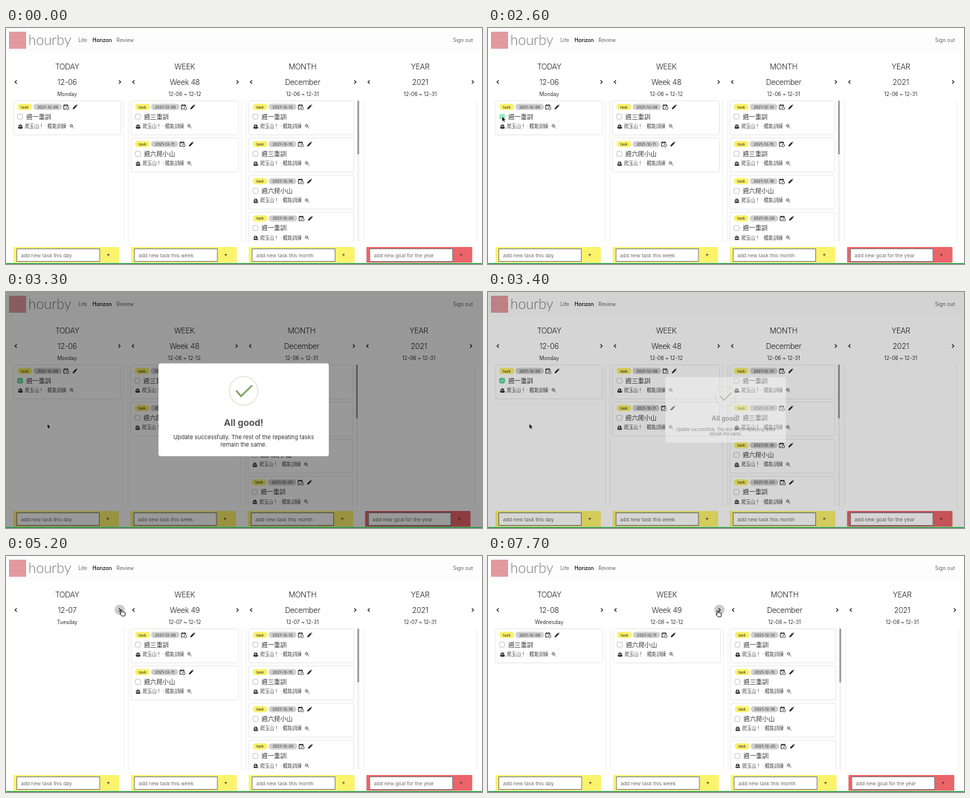
An HTML page that plays this animation: 640x319 px, repeating every 8 s.

```html
<!DOCTYPE html>
<html lang="en">
<head>
<meta charset="utf-8">
<title>Planner</title>
<style>
html, body { margin: 0; width: 100%; height: 100%; overflow: hidden; background: #fff; }
svg { display: block; width: 640px; height: 319px; }
text { font: 7px Inter, "Noto Sans CJK TC", "Noto Sans CJK", sans-serif; letter-spacing: -.06px; fill: #333; }
.mid { text-anchor: middle; }
.head { font-size: 10.2px; font-weight: 350; letter-spacing: -.25px; fill: #222; }
.nav { fill: #666; }
.brand { font: 300 19px Lato, sans-serif; fill: #777; }
.pill { font-size: 5.3px; text-anchor: middle; }
.title { font: 300 8.4px "Noto Sans CJK TC", "Noto Sans CJK", sans-serif; letter-spacing: 0; }
.goal { font-size: 6.3px; letter-spacing: 0; fill: #444; }
.hint { font-size: 6.8px; fill: #6c6c6c; }
.plus { font-weight: 600; text-anchor: middle; }
.line { fill: none; stroke: #333; }
#dialog .title { font: 600 12.3px Inter, sans-serif; fill: #444; }
#dialog .body { font-size: 7.8px; }
</style>
</head>
<body>
<svg viewBox="0 0 640 319">
  <defs>
    <clipPath id="list"><rect y="97.5" width="640" height="192"/></clipPath>
    <filter id="shadow" x="-10%" y="-20%" width="120%" height="150%">
      <feDropShadow dx="0" dy="1" stdDeviation="1.1" flood-opacity=".32"/>
    </filter>
    <g id="calendar">
      <path class="line" d="M6 3V1H.5V6.6H3M.5 1.7H6M1.7 0V1M4.8 0V1"/>
      <circle class="line" cx="5.6" cy="5.4" r="1.8" stroke-width=".8"/>
    </g>
    <path id="pencil" d="M0 6.5V5L4.1.9L5.6 2.4L1.5 6.5ZM4.6.5L5.1 0L6.5 1.4L6 1.9Z" fill="#222"/>
    <path id="boat" d="M2.6 0V4H.3ZM3.3.3Q6 2 6.2 4H3.3ZM0 4.7H6.8L6 6.6H1Z" fill="#222"/>
    <path id="lens" class="line" stroke-width=".7" d="M4 2.1A1.8 1.8 0 1 1 .4 2.1A1.8 1.8 0 1 1 4 2.1M3.5 3.5L5.6 5.6M1.5 2.1H2.9"/>
  </defs>
  <rect width="640" height="34" fill="#fdfdfd"/>
  <rect x="4" y="5" width="23" height="23" fill="#e29a9f"/>
  <text class="brand" x="30" y="22.5">hourby</text>
  <text class="nav" x="97.2" y="19.2">Life</text>
  <text x="116.3" y="19.2" style="fill:#000;font-weight:500">Horizon</text>
  <text class="nav" x="148.6" y="19.2">Review</text>
  <text class="nav" x="601" y="19.2">Sign out</text>
  <g id="page"></g>
  <rect id="dim" width="640" height="319"/>
  <g id="dialog">
    <rect x="205" y="96.5" width="229" height="125.5" rx="3" fill="#fff"/>
    <circle cx="319.5" cy="133.7" r="19.3" fill="none" stroke="#e4ecd9" stroke-width="1.6"/>
    <path id="tick" d="M309.5 133.3L316 140.8L331 126.3" fill="none" stroke="#78a162" stroke-width="2.2" pathLength="1" stroke-dasharray="1 2"/>
    <text class="mid title" x="319.5" y="180.8">All good!</text>
    <text class="mid body" x="319.5" y="199.3">Update successfully. The rest of the repeating tasks</text>
    <text class="mid body" x="319.5" y="208.6">remain the same.</text>
  </g>
  <path id="arrow" d="M0 0V6.8L1.5 5.4L2.6 7.8L3.8 7.3L2.7 5H4.8Z" stroke="#fff" stroke-width=".4"/>
  <path id="hand" d="M0 .7Q.8-.6 1.6.7V3.2Q2.4 2.6 3 3.4Q3.9 2.8 4.4 3.7Q5.6 3.3 5.8 4.5V6.5Q5.6 7.6 5 8.6H1.2L-1.5 5.4Q-1.4 4.3 0 5.2Z" fill="#fff" stroke="#111" stroke-width=".9"/>
  <rect y="317.8" width="640" height="1.2" fill="#1c9634"/>
</svg>
<script>
const LOOP = 8000, DIALOG_IN = 2710, DIALOG_OUT = 3313;
const $ = id => document.getElementById(id);
const clamp = v => Math.max(0, Math.min(1, v));
const NAMES = { "一": "週一重訓", "三": "週三重訓", "六": "週六爬小山" };
const MONTH = [["13", "一"], ["15", "三"], ["18", "六"], ["20", "一"]];
const DAYS = ["Monday", "Tuesday", "Wednesday"];

// Pointer path: time, x, y
const PATH = [[1400, -8, 185], [1700, 5, 160], [1900, 5, 160], [2500, 19, 119.5], [2720, 19, 119.5],
  [3150, 55.5, 178], [3650, 55.5, 178], [3800, 107.7, 128], [4300, 154.5, 72.5], [6650, 154.5, 72.5], [7500, 308, 73.5]];

function track(t) {
  const i = PATH.findIndex(p => p[0] > t);
  if (i < 0) return PATH[PATH.length - 1].slice(1);
  if (!i) return [-20, 185];
  const a = PATH[i - 1], b = PATH[i], u = (t - a[0]) / (b[0] - a[0]);
  const k = u * u * (3 - 2 * u);
  return [a[1] + (b[1] - a[1]) * k, a[2] + (b[2] - a[2]) * k];
}

const text = (x, y, s, cls = "") => `<text class="${cls}" x="${x}" y="${y}">${s}</text>`;
const box = (x, y, w, h, style) => `<rect x="${x}" y="${y}" width="${w}" height="${h}" ${style}/>`;
const use = (id, x, y) => `<use href="#${id}" x="${x}" y="${y}"/>`;

function card([day, kind], row, width, check, lifted) {
  const date = "2021-12-" + day, pill = 40 - date.split("1").length + 1;
  const fill = ["#fff", "#93ecc0", "#5bd694"][check];
  return `<g transform="translate(0 ${row * 50.2})">` +
    box(10, 98.5, width, 46, `rx="2" fill="#fff" stroke="#e9e9e9" ${lifted ? 'filter="url(#shadow)"' : ""}`) +
    box(15.5, 102.6, 19.5, 8.2, 'rx="4.1" fill="#faf066"') + text(25.2, 108.6, "task", "pill") +
    box(37, 102.6, pill, 8.2, 'rx="4.1" fill="#cfcfcf"') + text(37 + pill / 2, 108.6, date, "pill") +
    use("calendar", 39.2 + pill, 103.2) + use("pencil", 51.8 + pill, 103.2) +
    box(15.6, 116.4, 6.8, 6.8, `rx="1.2" fill="${fill}" stroke="${check ? fill : "#bbb"}" stroke-width=".8"`) +
    (check === 2 ? '<path d="M17.2 119.8L18.5 121.3L21 118.3" fill="none" stroke="#fff"/>' : "") +
    text(27.2, 122.6, NAMES[kind], "title") +
    use("boat", 16, 129.4) + text(25.3, 135, "爬玉山！ · 體能訓練", "goal") + use("lens", 85.6, 130) + "</g>";
}

function chevron(x, dir, hot) {
  return (hot ? `<circle cx="${x}" cy="72.7" r="7" fill="#ccc"/>` : "") +
    `<path d="M${x - dir * 1.2} 70.6l${dir * 2.4} 2.4l${-dir * 2.4} 2.4" fill="none" stroke="#222" stroke-width="1.1"/>`;
}

function drawPage({ step, check, lifted, pitch, hot }) {
  const day = "0" + (6 + step), from = "12-" + day + " ~ ";
  const week = [["08", "三"], ["11", "六"]];
  const columns = [
    ["TODAY", "12-" + day, DAYS[step], [[["06", "一"]], [], [week[0]]][step], "task this day"],
    ["WEEK", "Week " + (step ? 49 : 48), from + "12-12", step < 2 ? week : [week[1]], "task this week"],
    ["MONTH", "December", from + "12-31", MONTH, "task this month"],
    ["YEAR", "2021", from + "12-31", [], "goal for the year"]
  ];
  $("page").innerHTML = columns.map(([head, label, sub, cards, hint], i) => {
    const shrink = 158.2 - pitch;
    return `<g transform="translate(${i * pitch} 0)">` +
      text(82.2, 56, head, "mid head") + text(82.2, 77, label, "mid head") + text(82.2, 92, sub, "mid") +
      chevron(13.3, -1, hot === i * 2) + chevron(153 - shrink, 1, hot === i * 2 + 1) +
      `<path d="M${i ? 6.4 : -5} 98V289M${pitch} 98V289" stroke="#ebebeb" stroke-width=".8"/>` +
      `<g clip-path="url(#list)">` +
      cards.map((c, row) => card(c, row, (i === 2 ? 141.5 : 144.5) - shrink, i ? 0 : check, !i && lifted)).join("") + "</g>" +
      (i === 2 ? box(156 - shrink, 98, 2.4, 191, 'fill="#f1f1f1"') + box(156.2 - shrink, 98, 2, 73, 'rx="1" fill="#8c8c8c"') : "") +
      box(10, 296, 142.3 - shrink, 21.3, `rx="1" fill="${i === 3 ? "#eb6468" : "#fcf36c"}"`) +
      box(14.5, 298.5, 111.5 - shrink, 17, 'fill="#fff" stroke="#808080"') +
      text(20, 309.5, "add new " + hint, "hint") + text(137.5 - shrink, 309.4, "+", "plus") + "</g>";
  }).join("");
}

// Popup scale: overshoot on entry, shrink on exit
function popScale(t) {
  if (t >= DIALOG_OUT) return 1 - .5 * clamp((t - DIALOG_OUT) / 150);
  const u = clamp((t - DIALOG_IN) / 300);
  return u < .45 ? .7 + .35 * u / .45 : u < .8 ? 1.05 - .1 * (u - .45) / .35 : .95 + .05 * (u - .8) / .2;
}

let lastKey;
function draw(t) {
  const [x, y] = track(t);
  const step = t < 4900 ? 0 : t < 6200 ? 1 : 2;
  const pitch = t >= 2000 && t < 3650 ? 157.6 : 158.2;
  let hot = -1;
  for (let i = 0; i < 8; i++) {
    const cx = (i >> 1) * pitch + (i % 2 ? 153 : 13.3);
    if (Math.hypot(x - cx, y - 73) < 7) hot = i;
  }
  const state = {
    step, pitch, hot,
    check: step || t < 2500 ? 0 : t < 2700 ? 1 : 2,
    lifted: t > 3650 && y > 98 && y < 145 && x < 155
  };
  const key = JSON.stringify(state);
  if (key !== lastKey) drawPage(state);
  lastKey = key;

  const enter = clamp((t - DIALOG_IN) / 100), leave = clamp((t - DIALOG_OUT) / 150);
  $("dim").setAttribute("opacity", .4 * enter * (1 - leave));
  $("dialog").setAttribute("opacity", enter * (1 - leave));
  $("dialog").setAttribute("transform", `translate(319.5 159.2) scale(${popScale(t)}) translate(-319.5 -159.2)`);
  const drawn = clamp((t - DIALOG_IN - 380) / 200);
  $("tick").setAttribute("stroke-dashoffset", 1 - drawn);
  $("tick").setAttribute("visibility", drawn ? "visible" : "hidden");

  for (const [id, on] of [["arrow", hot < 0], ["hand", hot >= 0]]) {
    $(id).setAttribute("transform", `translate(${x} ${y})`);
    $(id).setAttribute("visibility", on ? "visible" : "hidden");
  }
}

function tick() {
  draw(performance.now() % LOOP);
  requestAnimationFrame(tick);
}
tick();
</script>
</body>
</html>
```
